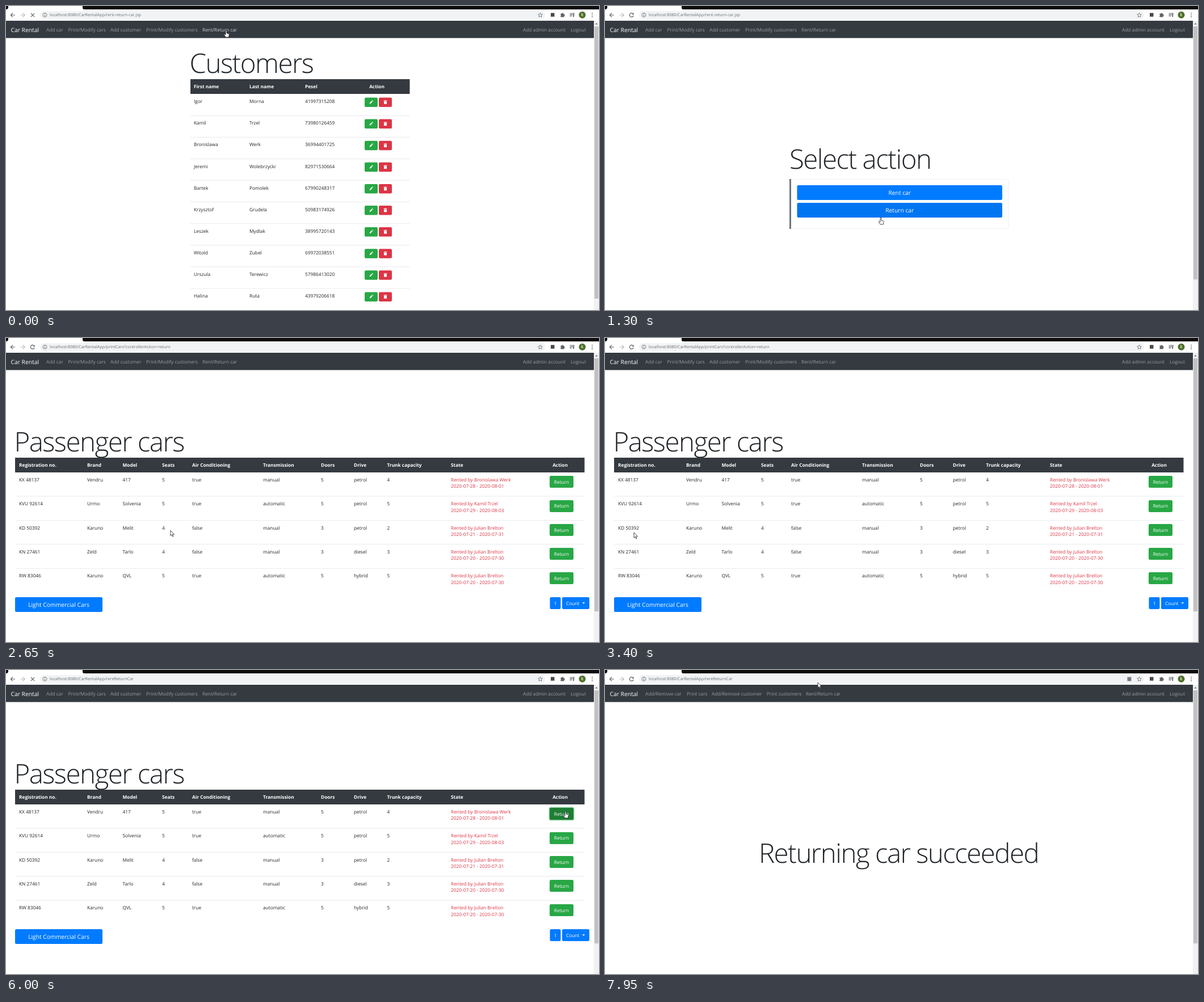
Write an HTML page that moves like this. It is 1045 by 536 pixels and loops after 8 s.

```html
<!DOCTYPE html>
<html lang="en">
<head>
<meta charset="utf-8">
<title>Car Rental</title>
<style>
html, body { margin: 0; width: 100%; height: 100%; overflow: hidden; background: #fff; }
svg { display: block; width: 100%; height: 100%; }
text { font: 8.3px "Open Sans", "Noto Sans", sans-serif; fill: #212529; text-rendering: geometricPrecision; white-space: pre; }
.title { font-size: 47.5px; font-weight: 300; letter-spacing: -.033em; }
.th { font-weight: 700; fill: #fff; }
.white { fill: #fff; }
.big { font-size: 10.3px; fill: #fff; }
.mid { text-anchor: middle; }
.link { fill: #9a9da0; }
.red { fill: #dc3545; }
.url { font-size: 7.2px; fill: #6a6d71; }
.icon { fill: none; stroke: #5f6368; stroke-width: 1.2; }
</style>
</head>
<body>
<svg id="stage" viewBox="0 0 1045 536"></svg>
<script>
const LOOP = 8000, STEP = 50;
const DARK = '#343a40', BLUE = '#007bff', GREEN = '#28a745', RED = '#dc3545';

const text = (s, x, y, cls = '', id = '') => `<text id="${id}" class="${cls}" x="${x}" y="${y}">${s}</text>`;
const rect = (x, y, w, h, fill, r = 0, id = '') =>
  `<rect id="${id}" x="${x}" y="${y}" width="${w}" height="${h}" rx="${r}" fill="${fill}"/>`;
const path = (d, attrs = 'class="icon"') => `<path d="${d}" ${attrs}/>`;
const group = (id, body) => `<g id="${id}">${body}</g>`;
const button = (label, x, y, w, h, fill, cls, id = '') =>
  rect(x, Math.round(y), w, h, fill, 2.3, id) + text(label, x + w / 2, y + h / 2 + (cls === 'big' ? 3.8 : 3.2), cls + ' mid');
const rule = (x, y, w) => rect(x, y, w, .7, '#dee2e6');

const browser = () =>
  rect(0, 0, 1045, 6, '#0d0b0b') +
  path('M4 0H135V3Q135 6 138 6H0Q4 6 4 2Z', 'fill="#fff"') +
  rect(60, 9, 890, 14, '#f1f3f4', 7) +
  path('M16 16H8.5M12 12.3L8.3 16L12 19.7') +
  path('M25.5 16H33M29.5 12.3L33.2 16L29.5 19.7', 'class="icon" style="stroke:#b9bbbe"') +
  group('reload', path('M49.7 13.8A3.5 3.5 0 1 0 50.2 17') + path('M50.6 12V15.2H47.4Z', 'fill="#5f6368"')) +
  group('stop', path('M43.8 12.8L50.2 19.2M50.2 12.8L43.8 19.2')) +
  path('M68.5 15.5V18M68.5 13.4V14.4', 'class="icon" style="stroke-width:.9"') +
  '<circle cx="68.5" cy="15.8" r="3.5" class="icon" style="stroke-width:.8"/>' +
  text('localhost:8080<tspan id="path"></tspan>', 77, 18.4, 'url') +
  group('translate', rect(920.5, 12.5, 7, 7, '#777b80')) +
  path('M941.5 12.2L942.6 14.7L945.3 15L943.3 16.8L943.9 19.4L941.5 18L939.1 19.4L939.7 16.8L937.7 15L940.4 14.7Z', 'class="icon" style="stroke-width:.8"') +
  rect(960, 12.3, 6.5, 6.5, '#4b4745') +
  path('M977.3 13.4H979.4A1.2 1.2 0 1 1 981.8 13.4H983.6V15.2A1.2 1.2 0 1 1 983.6 17.6V19.5H977.3V17.5A1.2 1.2 0 0 0 977.3 15.3Z', 'fill="#5f6368"') +
  path('M993.5 13H1000M993.5 15.3H1000M993.5 17.6H997M1000.6 18V13H1002') +
  '<circle cx="1000" cy="18" r="1.2" fill="#5f6368"/><circle cx="1015.5" cy="15.7" r="6" fill="#4f6f2b"/>' +
  text('k', 1015.5, 18, 'white mid') +
  [12.6, 15.8, 19].map(y => `<circle cx="1033" cy="${y}" r=".9" fill="#5f6368"/>`).join('') +
  rect(0, 26, 1036, 30.5, DARK) +
  text('Car Rental', 8.5, 45.6, 'big') +
  text('Add admin account', 911, 45, 'link') + text('Logout', 995, 45, 'link') +
  rect(1036, 26, 9, 510, '#f1f1f1') +
  path('M1038.3 32.5L1040.5 29.8L1042.7 32.5Z', 'fill="#707070"') +
  rect(1037, 36, 7, 446, '#c1c1c1', 0, 'thumb');

const menu = (id, labels, xs) =>
  group(id, labels.map((s, i) => text(s, xs[i], 45, 'link', i === 4 ? id + 'Rent' : '')).join(''));

const people = [
  'Igor,Morna,41997315208', 'Kamil,Trzel,73980126459', 'Bronislawa,Werk,36994401725',
  'Jeremi,Wolebrzycki,82971530664', 'Bartek,Pomolek,67990248317', 'Krzysztof,Grudela,50983174926',
  'Leszek,Mydlak,38995720143', 'Witold,Zubel,69972038551', 'Urszula,Terewicz,57986413020', 'Halina,Ruta,43979206618'
];

const customers = () =>
  text('Customers', 323.5, 118, 'title') + rect(325, 129, 386.5, 26, DARK) +
  ['First name', 'Last name', 'Pesel'].map((s, i) => text(s, 331 + 98 * i, 145.3, 'th')).join('') +
  text('Action', 653.5, 145.3, 'th mid') +
  people.map((row, i) => {
    const y = 155 + 38.1 * i;
    return row.split(',').map((s, c) => text(s, 331 + 98 * c, y + 16.2)).join('') +
      rect(632, y + 6.5, 23, 16.5, GREEN, 2.2) + rect(657, y + 6.5, 23, 16.5, RED, 2.2) +
      path(`M640.6 ${y + 17.4}l.4-1.9 3.3-3.3 1.5 1.5-3.3 3.3zM644.8 ${y + 11.7}l.8-.8 1.5 1.5-.8.8z`, 'fill="#fff"') +
      path(`M666 ${y + 13.2}h5v4.6h-5zM665.6 ${y + 11.6}h1.6l.5-.5h1.6l.5.5h1.6v1h-5.8z`, 'fill="#fff"') +
      (i ? rule(325, y - .3, 386.5) : '');
  }).join('');

const select = () =>
  text('Select action', 325, 287, 'title') +
  '<rect x="325.5" y="305.3" width="385.5" height="87" fill="none" stroke="#eee" stroke-width=".8"/>' +
  rect(325, 305, 3, 88, '#6c757d') +
  button('Rent car', 338.5, 316.2, 361.5, 26, BLUE, 'big') +
  button('Return car', 338.5, 346.8, 361.5, 26, BLUE, 'big', 'returnCar');

const columns = [23, 143, 205.5, 275, 328, 453, 555, 613, 671.5, 784];
const heads = 'Registration no.,Brand,Model,Seats,Air Conditioning,Transmission,Doors,Drive,Trunk capacity,State';
const cars = [
  'KX 48137,Vendru,417,5,true,manual,5,petrol,4,Bronislawa Werk,2020-07-28 - 2020-08-01',
  'KVU 92614,Urmo,Solvenia,5,true,automatic,5,petrol,5,Kamil Trzel,2020-07-29 - 2020-08-03',
  'KD 50392,Karuno,Melit,4,false,manual,3,petrol,2,Julian Brelton,2020-07-21 - 2020-07-31',
  'KN 27461,Zeld,Tarlo,4,false,manual,3,diesel,3,Julian Brelton,2020-07-20 - 2020-07-30',
  'RW 83046,Karuno,QVL,5,true,automatic,5,hybrid,5,Julian Brelton,2020-07-20 - 2020-07-30'
];

const passenger = () =>
  text('Passenger cars', 14.5, 200, 'title') + rect(16, 211, 1003.5, 26, DARK) +
  heads.split(',').map((s, i) => text(s, columns[i], 227, 'th')).join('') + text('Action', 976.5, 227, 'th mid') +
  cars.map((row, i) => {
    const y = 236.5 + 42.4 * i, cells = row.split(','), [renter, dates] = cells.splice(9);
    return cells.map((s, c) => text(s, columns[c], y + 16.2)).join('') +
      text('Rented by ' + renter, 784, y + 16.2, 'red') + text(dates, 784, y + 27.7, 'red') +
      button('Return', 958, y + 6.7, 42, 21, GREEN, 'white', i ? '' : 'returnFirst') +
      (i ? rule(16, y - .3, 1003.5) : '');
  }).join('') +
  button('Light Commercial Cars', 16, 457.2, 154, 26, BLUE, 'big') +
  button('1', 958.5, 457.2, 19, 21, BLUE, 'white') +
  rect(980, 457, 48, 21, BLUE, 2.3) + text('Count', 987, 470.7, 'white') +
  path('M1015.3 466.2H1020.3L1017.8 468.8Z', 'fill="#fff"');

const pointer = 'fill="#fff" stroke="#222" stroke-width=".8" stroke-linejoin="round"';
document.getElementById('stage').innerHTML = browser() +
  menu('menuA', ['Add car', 'Print/Modify cars', 'Add customer', 'Print/Modify customers', 'Rent/Return car'], [71, 109.5, 184, 247, 346]) +
  menu('menuB', ['Add/Remove car', 'Print cars', 'Add/Remove customer', 'Print customers', 'Rent/Return car'], [71, 144, 188, 285, 354]) +
  group('customers', customers()) + group('select', select()) + group('passenger', passenger()) +
  group('done', text('Returning car succeeded', 517.5, 340, 'title mid')) +
  group('arrow', path('M0 0V9.3L2.1 7.4L3.6 10.9L5 10.3L3.5 6.9H6.5Z', pointer)) +
  group('hand', path('M-1 1C-1-.4 1-.4 1 1V5L4.2 5.8C5.1 6 5.4 6.7 5.2 7.6L4.4 12H-1L-3.4 8C-4 7-2.8 6.3-2.1 7L-1 8Z', pointer));

// Pointer tip: time, x, y
const route = [
  [0, 388, 43], [50, 388, 43], [450, 440, 220], [850, 474, 393], [1050, 475, 396], [1300, 486, 373],
  [1450, 487, 370], [2050, 487, 370], [2500, 345, 328], [2900, 198, 358], [3050, 150, 361], [3300, 46, 352],
  [3400, 51, 343], [3750, 94, 272], [4000, 190, 252], [4300, 370, 246], [4600, 611, 249], [4650, 657, 250],
  [5000, 880, 246], [5200, 985, 244], [5400, 1007, 247], [5500, 1006, 247], [5650, 986, 249], [6200, 986, 249],
  [7050, 497, 142], [7500, 392, 46], [7700, 378, 38], [7900, 375, 25], [7950, 375, 22], [LOOP, 375, 22]
];

const $ = id => document.getElementById(id);
const show = (id, on) => { $(id).style.display = on ? '' : 'none'; };
const within = (t, a, b) => t >= a && t < b;

function pointerAt(t) {
  const i = route.findIndex(p => p[0] > t), [t0, x0, y0] = route[i - 1], [t1, x1, y1] = route[i];
  const k = (t - t0) / (t1 - t0);
  return [x0 + (x1 - x0) * k, y0 + (y1 - y0) * k];
}

function paintButton(id, t, hover, press, [normal, over, active]) {
  const p = Math.max(0, Math.min(1, (t - hover) / 150)) * 100;
  $(id).style.fill = t >= press ? active : `color-mix(in srgb, ${over} ${p}%, ${normal})`;
  $(id).style.stroke = t >= press ? normal : 'none';
  $(id).style.strokeOpacity = .5;
  $(id).style.strokeWidth = 3;
  $(id).style.paintOrder = 'stroke';
}

function draw(now) {
  const t = Math.floor(now % LOOP / STEP) * STEP;
  const page = t < 50 ? 'customers' : t < 1700 ? 'select' : t < 6100 ? 'passenger' : 'done';
  for (const id of ['customers', 'select', 'passenger', 'done']) show(id, id === page);
  show('menuA', page !== 'done');
  show('menuB', page === 'done');
  show('translate', page === 'done');

  const loading = t < 50 || within(t, 1550, 1700) || within(t, 5950, 6100);
  show('stop', loading);
  show('reload', !loading);
  $('path').textContent = '/CarRentalApp/' +
    (t < 1600 ? 'rent-return-car.jsp' : t < 5950 ? 'printCars?controllerAction=return' : 'rentReturnCar');
  $('thumb').setAttribute('height', page === 'customers' ? 480 : 446);

  $('menuARent').style.fill = t < 50 ? '#cccecf' : '';
  $('menuBRent').style.fill = within(t, 7500, 7750) ? '#cccecf' : '';
  paintButton('returnCar', t, 1250, 1500, [BLUE, '#0069d9', '#0062cc']);
  paintButton('returnFirst', t, 5550, 5850, [GREEN, '#218838', '#1e7e34']);

  const hand = t < 50 || within(t, 1250, 2100) || within(t, 5550, 6250) || within(t, 7500, 7750);
  show('hand', hand);
  show('arrow', !hand);
  $(hand ? 'hand' : 'arrow').setAttribute('transform', `translate(${pointerAt(t)})`);
}

const start = performance.now();
function tick() {
  draw(performance.now() - start);
  requestAnimationFrame(tick);
}
tick();
</script>
</body>
</html>
```
